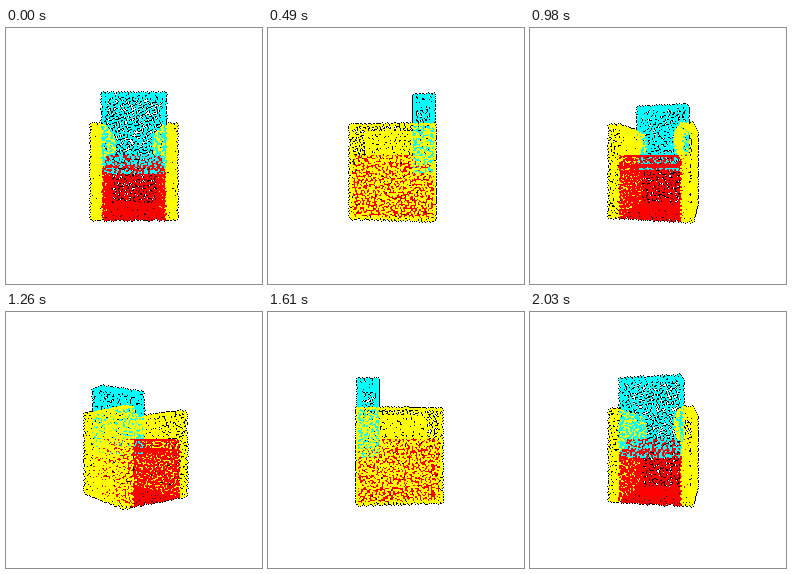
These frames come from a looping animation (256 by 256 pixels, 2.1 s). An HTML page with a canvas:

```html
<!DOCTYPE html>
<html lang="en">
<head>
<meta charset="utf-8">
<title>Rotating armchair point cloud</title>
<style>
html, body { margin: 0; height: 100%; overflow: hidden; background: #fff; }
canvas { display: block; width: 100vw; height: 100vh; image-rendering: pixelated; }
</style>
</head>
<body>
<canvas id="stage" width="256" height="256"></canvas>
<script>
const SIZE = 256, STEP_MS = 70, STEPS = 30, CAMERA = 240, SPACING = 2.8;
// Packed as ABGR
const WHITE = 0xffffffff, BLACK = 0xff000000;
const CYAN = 0xffffff00, YELLOW = 0xff00ffff, RED = 0xff0000ff;
// Dark fringe pixels around each 2 by 2 dot
const FRINGE = [[-1, 0], [1, -1], [2, 1], [0, 2]];

const ctx = document.getElementById('stage').getContext('2d');
const image = ctx.createImageData(SIZE, SIZE);
const pixels = new Uint32Array(image.data.buffer);
const depth = new Float32Array(SIZE * SIZE);
const points = [];

let seed = 7;
function random() {
  seed = (seed * 1664525 + 1013904223) >>> 0;
  return seed / 4294967296;
}

// Scatters dots over a surface; place(u, v) returns [x, y, z]
function scatter(color, width, height, place, spacing = SPACING) {
  const cols = Math.max(1, Math.round(width / spacing));
  const rows = Math.max(1, Math.round(height / spacing));
  for (let i = 0; i < cols; i++) {
    for (let j = 0; j < rows; j++) {
      const [x, y, z] = place((i + random()) / cols, (j + random()) / rows);
      points.push({ x, y, z, color });
    }
  }
}

const mix = (a, b, t) => a + (b - a) * t;

function box(color, x0, x1, y0, y1, z0, z1, spacing) {
  const w = x1 - x0, h = y1 - y0, d = z1 - z0;
  for (const x of [x0, x1])
    scatter(color, d, h, (u, v) => [x, mix(y0, y1, v), mix(z0, z1, u)], spacing);
  for (const y of [y0, y1])
    scatter(color, w, d, (u, v) => [mix(x0, x1, u), y, mix(z0, z1, v)], spacing);
  for (const z of [z0, z1])
    scatter(color, w, h, (u, v) => [mix(x0, x1, u), mix(y0, y1, v), z], spacing);
}

const FLOOR = -53.8, REACH = 36.5;

// Armrest with a padded inner side above the seat
function arm(side) {
  const top = 27.5, height = top - FLOOR;
  const inner = y => 27.5 - (y > 0 ? 6 * Math.sqrt(Math.max(0, Math.sin(Math.PI * y / top))) : 0);
  const along = t => mix(-REACH, REACH, t);
  const up = t => mix(FLOOR, top, t);
  scatter(YELLOW, 2 * REACH, height, (u, v) => [side * REACH, up(v), along(u)]);
  scatter(YELLOW, 2 * REACH, height, (u, v) => [side * inner(up(v)), up(v), along(u)]);
  for (const y of [FLOOR, top])
    scatter(YELLOW, 9, 2 * REACH, (u, v) => [side * mix(27.5, REACH, u), y, along(v)]);
  for (const z of [-REACH, REACH])
    scatter(YELLOW, 10, height, (u, v) => [side * mix(inner(up(v)), REACH, u), up(v), z]);
}

arm(-1);
arm(1);
box(CYAN, -27, 27, -14, 54.3, 18.5, 36);
box(RED, -26.8, 26.8, -9, 0.3, -REACH, 18.5, 3.6);
box(RED, -26.8, 26.8, FLOOR, -9, -REACH, REACH);

function render(angle) {
  const c = Math.cos(angle), s = Math.sin(angle);
  pixels.fill(WHITE);
  depth.fill(-1e9);
  for (const p of points) {
    const z = p.z * c - p.x * s;
    const scale = CAMERA / (CAMERA - z);
    const px = Math.round(127 + (p.x * c + p.z * s) * scale);
    const py = Math.round(127.5 - p.y * scale);
    for (const [dx, dy] of FRINGE) {
      const k = (py + dy) * SIZE + px + dx;
      if (pixels[k] === WHITE) pixels[k] = BLACK;
    }
    for (let n = 0; n < 4; n++) {
      const k = (py + (n >> 1)) * SIZE + px + (n & 1);
      if (z > depth[k]) {
        depth[k] = z;
        pixels[k] = p.color;
      }
    }
  }
  ctx.putImageData(image, 0, 0);
}

const start = performance.now();
let shown = -1;
function tick() {
  const step = Math.floor((performance.now() - start) / STEP_MS) % STEPS;
  if (step !== shown) {
    shown = step;
    render(step * 2 * Math.PI / STEPS);
  }
  requestAnimationFrame(tick);
}
tick();
</script>
</body>
</html>
```
